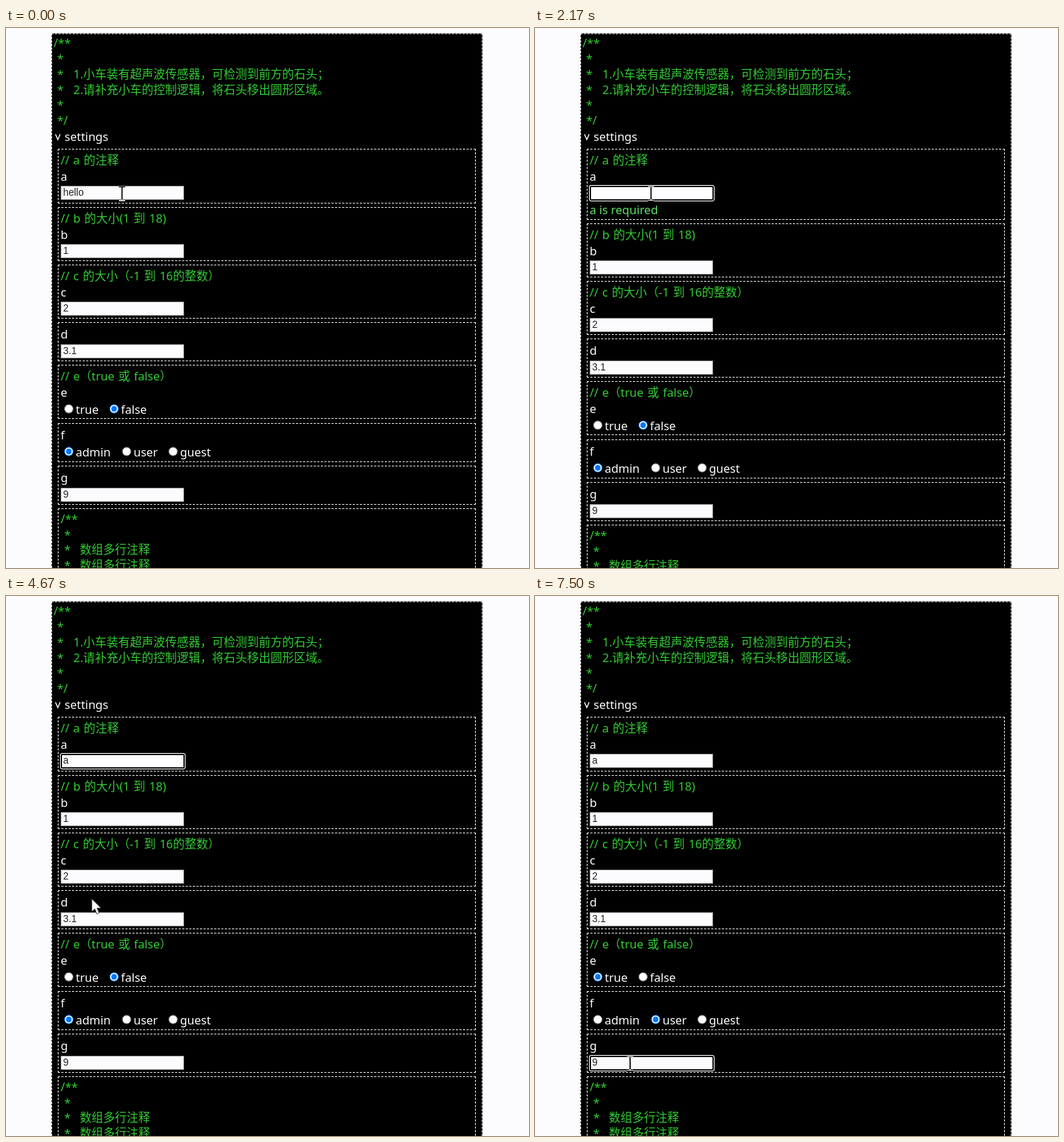
Write an HTML page that moves like this. It is 737 by 760 pixels and loops after 8 s.

```html
<!DOCTYPE html>
<html lang="zh-CN">
<head>
<meta charset="utf-8">
<title>settings form</title>
<style>
html, body { margin: 0; width: 100%; height: 100%; overflow: hidden; background: #fcfcfe; }
svg { display: block; width: 737px; height: 760px; }
text { font: 16.5px "Noto Sans", "Noto Sans CJK SC", "Noto Sans CJK", sans-serif; white-space: pre; }
.note { fill: #32cd32; word-spacing: 1.2px; }
.label { fill: #fff; font-weight: 500; }
.error { fill: #5ee065; font-weight: 500; }
.value { fill: #222; font: 13.75px "Liberation Sans", Arial, sans-serif; }
.beam { fill: none; stroke: #fff; stroke-width: 1.7; mix-blend-mode: difference; }
.arrow { fill: #fff; stroke: #222; stroke-width: .8; }
</style>
</head>
<body>
<svg id="stage" viewBox="0 0 737 760"></svg>
<script>
const stage = document.getElementById('stage');
const LOOP = 8000, TICK = 1000 / 12, LINE = 21.7, ERROR_HEIGHT = 23;

const text = (cls, x, y, s) => `<text class="${cls}" x="${x}" y="${y}">${s}</text>`;
const rect = (x, y, w, h, attrs) => `<rect x="${x}" y="${y}" width="${w}" height="${h}" ${attrs}/>`;

// 3px dashes with the gap tuned so that each side ends on a dash
function dashed(x1, y1, x2, y2) {
  const len = Math.hypot(x2 - x1, y2 - y1), n = Math.round((len + 2) / 5);
  const gap = (len - 3 * n) / (n - 1);
  return `<path d="M${x1} ${y1}L${x2} ${y2}" stroke="#fff" stroke-dasharray="3 ${gap}"/>`;
}
const frame = (x, y, r, b) =>
  dashed(x, y + .5, r, y + .5) + dashed(x, b - .5, r, b - .5) +
  dashed(x + .5, y, x + .5, b) + dashed(r - .5, y, r - .5, b);

function comment(x, y, lines) {
  return lines.map((s, i) => {
    const by = y + i * LINE;
    if (!i) return text('note', x, by, '/**');
    if (s === '*/') return text('note', x + 5, by, s);
    return text('note', x + 5, by, '*') + text('note', x + (/^\d/.test(s) ? 28 : 27), by, s);
  }).join('');
}

function input(y, value, focus, caret) {
  let s = rect(77, y, 174, 20, 'fill="#fcfcff"') +
    rect(77.5, y + .5, 173, 19, 'fill="none" stroke="#858585"');
  if (focus) {
    s += rect(76.5, y - .5, 176, 22, 'rx="2.5" fill="#fcfcff" stroke="#fff"') +
      rect(78, y + 1, 173, 19, 'rx="1.5" fill="none" stroke="#101010" stroke-width="2"');
  }
  s += text('value', 80.5, y + 14, value);
  return caret ? s + rect(caret, y + 2, 1, 15, 'fill="#000"') : s;
}

function radio(x, y, name, on, hover) {
  const blue = hover ? '#005cc8' : '#0075ff';
  const dot = on ? `<circle cx="${x}" cy="${y}" r="3.9" fill="${blue}"/>` : '';
  return `<circle cx="${x}" cy="${y}" r="6" fill="#fff" stroke="${on ? blue : '#767676'}"/>` +
    dot + text('label', x + 9.7, y + 6.5, name);
}

const typed = [[33, 'a'], [25, ''], [22, 'h'], [21, 'he'], [20, 'hel'], [18, 'hell'], [0, 'hello']];
const within = (k, ...spans) => spans.some(([a, b]) => k >= a && k < b);

// pointer stops: [start tick, end tick, x, y]
const moves = [[0, 0, 163.5, 233], [38, 47, 150, 313], [53, 63, 93, 535], [66, 73, 165, 594], [77, 84, 134, 658]];
function pointer(k) {
  let x = 0, y = 0;
  for (const [a, b, tx, ty] of moves) {
    if (k < a) break;
    const p = b > a ? Math.min(1, (k - a) / (b - a)) : 1, e = 1 - (1 - p) ** 2;
    x += (tx - x) * e;
    y += (ty - y) * e;
  }
  return [x, y];
}
function cursor(k) {
  const [x, y] = pointer(k);
  const overInput = x > 77 && x < 251 && [222, 304, 385, 445, 647].some(t => y >= t && y <= t + 20);
  const shape = overInput
    ? 'class="beam" d="M-4.5 -9.5H4.5M-4.5 10H4.5M0 -9.5V10"'
    : 'class="arrow" d="M0 0V18L4.2 14.2L7.2 21.4L10.4 20L7.4 13H13Z"';
  return `<path ${shape} transform="translate(${x} ${y})"/>`;
}

function draw(k) {
  const value = typed.find(([at]) => k >= at)[1];
  const missing = value === '', shift = missing ? ERROR_HEIGHT : 0;
  const caretA = within(k, [6, 13]) ? 109
    : within(k, [22, 25], [33, 39], [45, 52], [58, 64]) ? 88 : 0;
  const isTrue = k >= 65, isUser = k >= 75;
  const box = (top, h) => frame(73, top, 662, top + h);
  const field = (top, name, val, note) => {
    const d = note ? 0 : -21;
    return box(top, note ? 76 : 55) + (note ? text('note', 77, top + 21.7, note) : '') +
      text('label', 77, top + (note ? 44.7 : 23.3), name) +
      (val === undefined ? '' : input(top + 52 + d, val, name === 'g' && k >= 84, name === 'g' && within(k, [84, 90]) ? 88 : 0));
  };

  stage.innerHTML =
    rect(64, 7.5, 607.5, 760, '') + frame(64, 7.5, 671.5, 780) +
    comment(67, 27.4, ['', '', '1.小车装有超声波传感器，可检测到前方的石头；',
      '2.请补充小车的控制逻辑，将石头移出圆形区域。', '', '*/']) +
    '<path d="M69.7 149.5L73 157L76.3 149.5" fill="none" stroke="#fff" stroke-width="1.4"/>' +
    text('label', 82.5, 159, 'settings') +
    box(170, 77 + shift) + text('note', 77, 192, '// a 的注释') + text('label', 77, 215, 'a') +
    input(222, value, within(k, [6, 64]), caretA) +
    (missing ? text('error', 77, 262.3, 'a is required') : '') +
    `<g transform="translate(0 ${shift})">` +
    field(252, 'b', '1', '// b 的大小(1 到 18)') +
    field(333, 'c', '2', '// c 的大小（-1 到 16的整数）') +
    field(414, 'd', '3.1') +
    field(474, 'e', undefined, '// e（true 或 false）') +
    radio(88.5, 536, 'true', isTrue, within(k, [65, 67])) + radio(152.3, 536, 'false', !isTrue) +
    field(556, 'f') +
    radio(88.5, 596, 'admin', !isUser) + radio(170, 596, 'user', isUser, within(k, [75, 78])) +
    radio(235.5, 596, 'guest', false) +
    field(616, 'g', '9') +
    frame(73, 676, 662, 800) +
    comment(77, 697, ['', '', '数组多行注释', '数组多行注释']) +
    '</g>' + cursor(k);
}

let last = -1;
function play() {
  const k = Math.floor((performance.now() % LOOP + 4) / TICK);
  if (k !== last) draw(last = k);
  requestAnimationFrame(play);
}
play();
</script>
</body>
</html>
```
